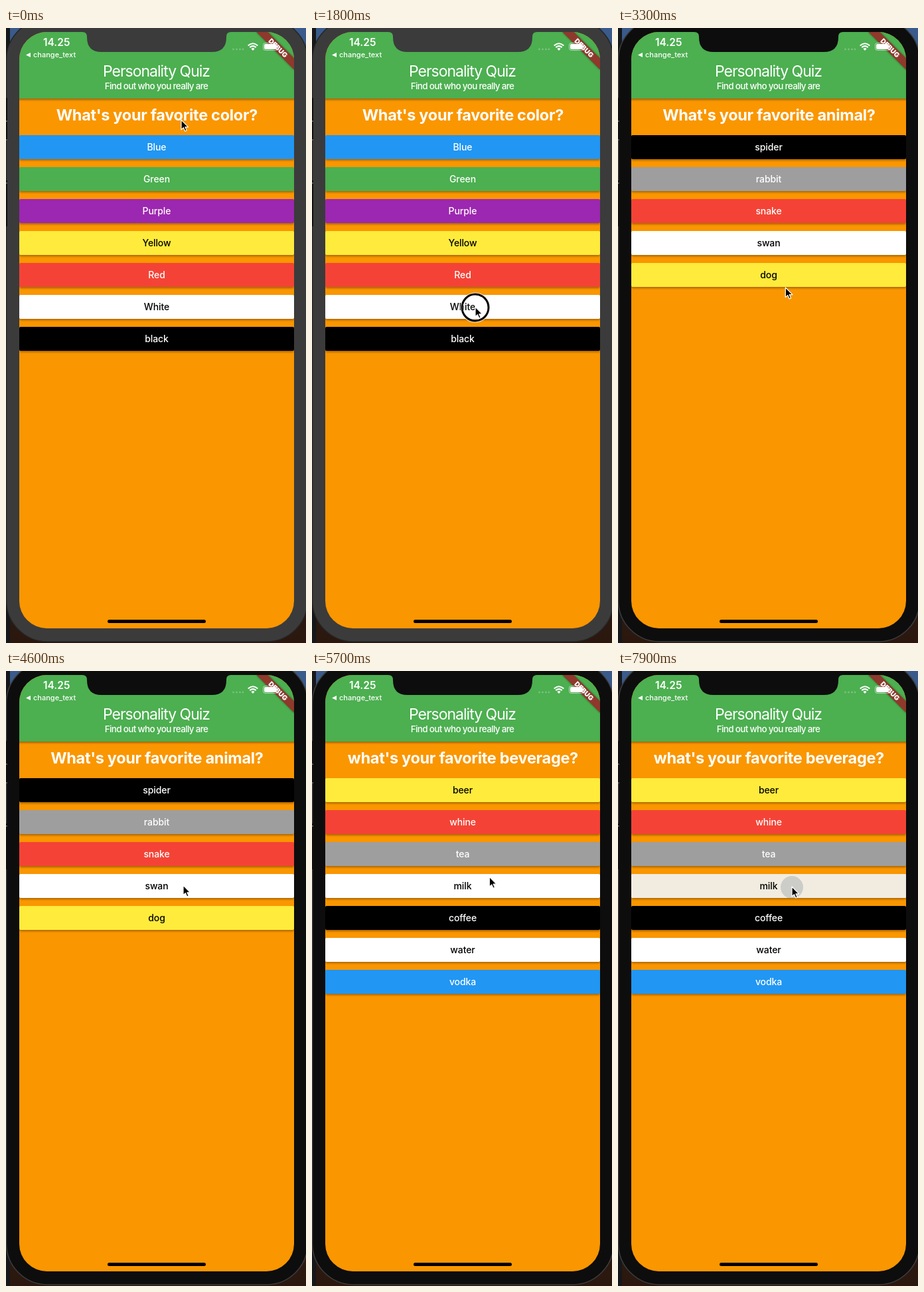
An HTML page for the animation above (8 s loop, 452 by 924 pixels).

```html
<!DOCTYPE html>
<html lang="en">
<head>
<meta charset="utf-8">
<title>Personality quiz</title>
<style>
  html, body { margin: 0; width: 100%; height: 100%; overflow: hidden; background: #17191d; }
  svg { display: block; width: 100%; height: 100%; }
  text { font-family: Inter, "Open Sans", sans-serif; fill: #fff; }
  .mid { text-anchor: middle; }
  .title { font-size: 23px; letter-spacing: -1px; }
  .sub { font-size: 13.5px; font-weight: 500; letter-spacing: -.68px; }
  .question { font-size: 23.5px; font-weight: 700; letter-spacing: -.31px; }
  .label { font-size: 14px; font-weight: 500; letter-spacing: -.1px; }
  .clock { font-size: 15.5px; font-weight: 600; }
  .back { font-size: 11px; font-weight: 500; }
  .debug { font-size: 10.2px; font-weight: 900; }
</style>
</head>
<body>
<svg viewBox="0 0 452 924">
  <defs>
    <clipPath id="screen"><rect x="20" y="6" width="414" height="896" rx="41.5"/></clipPath>
    <clipPath id="rowClip"><rect id="rowShape" x="20" width="414" height="36" rx="2"/></clipPath>
    <linearGradient id="desk" x1="0" y1="0" x2="0" y2="1">
      <stop offset="0" stop-color="#3a5b8c"/>
      <stop offset=".5" stop-color="#27303f"/>
      <stop offset="1" stop-color="#2b170d"/>
    </linearGradient>
    <filter id="soft" x="-20%" y="-50%" width="140%" height="200%"><feGaussianBlur stdDeviation="1.6"/></filter>
  </defs>

  <rect width="452" height="924" fill="url(#desk)"/>
  <rect width="6" height="924" fill="#15171a"/>
  <rect id="bezel" x=".5" y="-14" width="454" height="936" rx="62" stroke-width="1.5"/>
  <path d="M1 105V168M1 229V298" stroke="#111" stroke-width="2"/>
  <path d="M0 140H2M0 168H2M0 233H2" stroke="#555" stroke-width="2"/>

  <g clip-path="url(#screen)">
    <rect x="20" y="6" width="414" height="896" fill="#fa9600"/>
    <rect x="16" y="90" width="422" height="18" fill="#000" opacity=".35" filter="url(#soft)"/>
    <rect x="20" y="6" width="414" height="100" fill="#4caf50"/>
    <text class="mid title" x="226.5" y="73">Personality Quiz</text>
    <text class="mid sub" x="226.5" y="92">Find out who you really are</text>
    <text class="mid question" id="question" x="227.4" y="139"></text>
    <g id="rows"></g>
    <g id="splash" clip-path="url(#rowClip)">
      <rect id="tint" x="20" width="414" height="36" fill="#f2ece0"/>
      <circle id="ripple" fill="#768490"/>
    </g>
    <g id="labels"></g>

    <g transform="translate(434 6) rotate(45)">
      <rect x="-40" y="28" width="80" height="12" fill="#000" opacity=".5" filter="url(#soft)"/>
      <rect x="-40" y="28" width="80" height="12" fill="#8f382c"/>
      <text class="mid debug" y="37.7">DEBUG</text>
    </g>
    <g fill="#fff">
      <text class="clock" x="56" y="27">14.25</text>
      <path d="M30 40.5L37 37V44Z"/>
      <text class="back" x="41" y="44">change_text</text>
      <g opacity=".25">
        <circle cx="342.5" cy="32" r="1.4"/><circle cx="347.5" cy="32" r="1.4"/>
        <circle cx="352.5" cy="32" r="1.4"/><circle cx="357" cy="32" r="1.4"/>
      </g>
      <path d="M372 34L369.4 31.2Q372 29 374.6 31.2Z"/>
      <path d="M367.3 29.1Q372 25.1 376.7 29.1M364.7 26.5Q372 20 379.3 26.5" fill="none" stroke="#fff" stroke-width="2.1"/>
      <rect x="387.5" y="22.5" width="22" height="11" rx="3.2" fill="none" stroke="#fff" opacity=".55"/>
      <rect x="389" y="24" width="19" height="8" rx="2"/>
      <path d="M411 26Q413 28 411 30Z" opacity=".6"/>
    </g>
    <rect x="153" y="889" width="148" height="5" rx="2.5"/>
  </g>
  <path id="notch" d="M115 5H339V6Q332 6 332 13V14Q332 36 310 36H144Q122 36 122 14V13Q122 6 115 6Z"/>

  <g id="ring" fill="none">
    <circle r="20" stroke="#fff" stroke-width="5" opacity=".8"/>
    <circle r="20" stroke="#000" stroke-width="3"/>
  </g>
  <path id="cursor" d="M0 0V14.8L3.4 11.7L5.8 17L8.2 16L5.9 10.8H10.6Z" fill="#000" stroke="#fff" stroke-width="1.2" stroke-linejoin="round"/>
</svg>

<script>
const LOOP = 8000, STEP = 100;
const $ = id => document.getElementById(id);
const BLUE = '#2196f3', GREEN = '#4caf50', PURPLE = '#9c27b0', YELLOW = '#ffeb3b',
      RED = '#f44336', WHITE = '#ffffff', BLACK = '#000000', GREY = '#9e9e9e';

const pages = [
  { start: 0, question: "What's your favorite color?",
    rows: [['Blue', BLUE], ['Green', GREEN], ['Purple', PURPLE], ['Yellow', YELLOW],
           ['Red', RED], ['White', WHITE], ['black', BLACK]] },
  { start: 2000, question: "What's your favorite animal?",
    rows: [['spider', BLACK], ['rabbit', GREY], ['snake', RED], ['swan', WHITE], ['dog', YELLOW]] },
  { start: 5000, question: "what's your favorite beverage?",
    rows: [['beer', YELLOW], ['whine', RED], ['tea', GREY], ['milk', WHITE],
           ['coffee', BLACK], ['water', WHITE], ['vodka', BLUE]] }
];
const taps = [
  { start: 1800, row: 5, x: 246, y: 420 },
  { start: 4800, row: 3, x: 267, y: 323 },
  { start: 7800, row: 3, x: 262, y: 325 }
];
// Pointer stops: time, x, y
const stops = [
  [0, 264, 138], [600, 264, 138], [1500, 246, 419], [2900, 246, 419], [4000, 267, 322],
  [5500, 267, 322], [6300, 269, 241], [6800, 269, 241], [7500, 262, 324], [LOOP, 262, 324]
];

const clamp = v => Math.min(1, Math.max(0, v));
const smooth = v => { v = clamp(v); return v * v * (3 - 2 * v); };
const rowY = i => 161 + 48 * i;
const ink = color => color === WHITE || color === YELLOW ? 0 : 255;

function set(el, attrs) {
  for (const name in attrs) el.setAttribute(name, attrs[name]);
  return el;
}
function add(parent, tag, attrs) {
  return parent.appendChild(set(document.createElementNS('http://www.w3.org/2000/svg', tag), attrs));
}
const show = (el, visible) => set(el, { visibility: visible ? 'visible' : 'hidden' });

const rows = pages[0].rows.map((_, i) => {
  const group = add($('rows'), 'g', {});
  const y = rowY(i);
  add(group, 'rect', { x: 20, y: y + 2, width: 414, height: 36, rx: 2, opacity: .32, filter: 'url(#soft)' });
  const face = add(group, 'rect', { x: 20, y, width: 414, height: 36, rx: 2 });
  const label = add($('labels'), 'text', { class: 'mid label', x: 227, y: y + 23 });
  return { group, face, label };
});

function drawPage(t) {
  const index = pages.findLastIndex(p => t >= p.start);
  const page = pages[index], previous = pages[index - 1];
  const fade = smooth((t - page.start) / 300);
  $('question').textContent = page.question;
  rows.forEach(({ group, face, label }, i) => {
    const item = page.rows[i];
    show(group, item);
    show(label, item);
    if (!item) return;
    const to = ink(item[1]);
    const old = previous && previous.rows[i];
    const from = old ? ink(old[1]) : to;
    const level = Math.round(from + (to - from) * fade);
    set(face, { fill: item[1] });
    label.textContent = item[0];
    label.style.fill = `rgb(${level},${level},${level})`;
  });
  return page;
}

function drawTap(t, page) {
  const tap = taps.find(p => t >= p.start && t < p.start + 600);
  const age = tap ? t - tap.start : 0;
  const splashing = tap && age >= 100 && tap.row < page.rows.length;
  show($('ring'), tap && age < 100);
  set($('splash'), { display: splashing ? 'inline' : 'none' });
  if (!tap) return;
  const y = rowY(tap.row);
  set($('ring'), { transform: `translate(${tap.x} ${tap.y})` });
  set($('rowShape'), { y });
  set($('tint'), { y, opacity: clamp(1.2 - age * .002) });
  set($('ripple'), {
    cx: tap.x, cy: tap.y, r: Math.max(0, 17 + .28 * (age - 100)),
    opacity: age <= 300 ? .35 - age * .0005 : .2 * clamp((600 - age) / 300)
  });
}

function drawPointer(t) {
  const next = stops.findIndex(s => s[0] > t);
  const [t0, x0, y0] = stops[next - 1], [t1, x1, y1] = stops[next];
  const p = smooth((t - t0) / (t1 - t0));
  set($('cursor'), { transform: `translate(${x0 + (x1 - x0) * p} ${y0 + (y1 - y0) * p})` });
}

function draw(t) {
  const lit = t < 1900;
  set($('bezel'), { fill: lit ? '#3b3b3b' : '#0d0d0d', stroke: lit ? '#252525' : '#3c3c3c' });
  set($('notch'), { fill: lit ? '#3b3b3b' : '#0d0d0d' });
  drawTap(t, drawPage(t));
  drawPointer(t);
}

const began = performance.now();
function tick() {
  const t = (performance.now() - began) % LOOP;
  draw(Math.floor(t / STEP) * STEP);
  requestAnimationFrame(tick);
}
tick();
</script>
</body>
</html>
```
